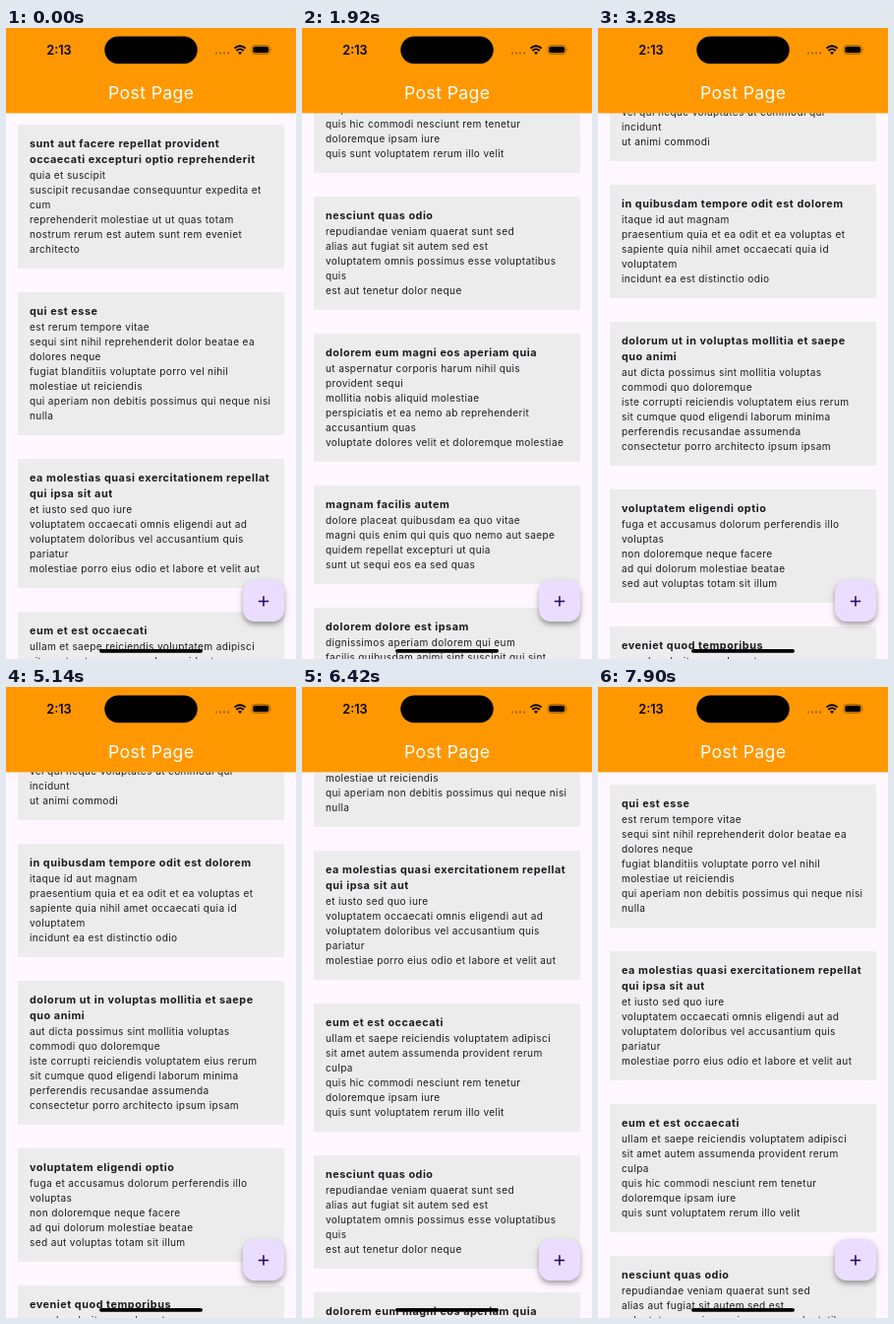
Animation, 295 px wide and 640 px high, one loop 8000 ms. Source, as an HTML page:

```html
<!DOCTYPE html>
<html lang="en">
<head>
<meta charset="utf-8">
<title>Post Page</title>
<style>
  html, body { margin: 0; width: 295px; height: 640px; overflow: hidden; }
  body { position: relative; background: #fef7ff; font-family: Inter, "Open Sans", sans-serif; }
  #list { position: absolute; left: 12px; top: 98px; width: 271px; }
  article { box-sizing: border-box; padding: 12px; margin-bottom: 24px; background: #ececec; color: #1d1b20;
    font-size: 10.1px; line-height: 15px; letter-spacing: .35px; white-space: pre; }
  h2 { margin: 0; font-size: 10.8px; font-weight: 700; line-height: 16px; letter-spacing: .54px; }
  #overlay { position: absolute; left: 0; top: 0; }
  #fab { position: absolute; left: 241px; top: 560.4px; width: 42px; height: 42px; border-radius: 12px;
    background: #eaddff; box-shadow: 0 3px 4px rgba(0, 0, 0, .25), 0 3px 9px rgba(0, 0, 0, .14); }
</style>
</head>
<body>
<div id="list"></div>
<div id="fab"></div>
<svg id="overlay" width="295" height="640">
  <rect width="295" height="86.4" fill="#ff9800"/>
  <rect x="100.3" y="8.4" width="94.4" height="27.8" rx="13.9"/>
  <text x="54" y="26.5" font-size="12.7" font-weight="600" text-anchor="middle">2:13</text>
  <text x="147.7" y="72" font-size="17.6" letter-spacing=".4" text-anchor="middle" fill="#fff">Post Page</text>
  <path d="M213 25.5h14" stroke="#a86708" stroke-width="2" stroke-dasharray="2 2"/>
  <g fill="none" stroke="#000" stroke-width="1.9">
    <path d="M232.4 20.6a8 8 0 0 1 11.2 0M234.4 23a5.2 5.2 0 0 1 7.2 0"/>
  </g>
  <path d="M238 27l-2-2.1a2.9 2.9 0 0 1 4 0z"/>
  <rect x="250" y="17.5" width="18.5" height="9" rx="2.8" fill="none" stroke="#a86708" stroke-width=".9"/>
  <rect x="251.3" y="18.8" width="15.9" height="6.4" rx="1.7"/>
  <path d="M269.5 20.4q1.4 1.6 0 3.2z" fill="#a86708"/>
  <path d="M256.8 581.4h10.4M262 576.2v10.4" stroke="#21005d" stroke-width="1.5"/>
  <rect x="95" y="629.9" width="105" height="3.8" rx="1.9"/>
</svg>
<script>
// Title lines start with "#"; posts are separated by blank lines.
const posts = `#sunt aut facere repellat provident
#occaecati excepturi optio reprehenderit
quia et suscipit
suscipit recusandae consequuntur expedita et
cum
reprehenderit molestiae ut ut quas totam
nostrum rerum est autem sunt rem eveniet
architecto

#qui est esse
est rerum tempore vitae
sequi sint nihil reprehenderit dolor beatae ea
dolores neque
fugiat blanditiis voluptate porro vel nihil
molestiae ut reiciendis
qui aperiam non debitis possimus qui neque nisi
nulla

#ea molestias quasi exercitationem repellat
#qui ipsa sit aut
et iusto sed quo iure
voluptatem occaecati omnis eligendi aut ad
voluptatem doloribus vel accusantium quis
pariatur
molestiae porro eius odio et labore et velit aut

#eum et est occaecati
ullam et saepe reiciendis voluptatem adipisci
sit amet autem assumenda provident rerum
culpa
quis hic commodi nesciunt rem tenetur
doloremque ipsam iure
quis sunt voluptatem rerum illo velit

#nesciunt quas odio
repudiandae veniam quaerat sunt sed
alias aut fugiat sit autem sed est
voluptatem omnis possimus esse voluptatibus
quis
est aut tenetur dolor neque

#dolorem eum magni eos aperiam quia
ut aspernatur corporis harum nihil quis
provident sequi
mollitia nobis aliquid molestiae
perspiciatis et ea nemo ab reprehenderit
accusantium quas
voluptate dolores velit et doloremque molestiae

#magnam facilis autem
dolore placeat quibusdam ea quo vitae
magni quis enim qui quis quo nemo aut saepe
quidem repellat excepturi ut quia
sunt ut sequi eos ea sed quas

#dolorem dolore est ipsam
dignissimos aperiam dolorem qui eum
facilis quibusdam animi sint suscipit qui sint
possimus cum
quaerat magni maiores excepturi
ipsam ut commodi dolor voluptatum modi aut
vitae

#nesciunt iure omnis dolorem tempora et
#accusantium
consectetur animi nesciunt iure dolore
enim quia ad
veniam autem ut quam aut nobis
et est aut quod aut provident voluptas autem
voluptas

#optio molestias id quia eum
quo et expedita modi cum officia vel magni
doloribus qui repudiandae
vero nisi sit
quos veniam quod sed accusamus veritatis
error

#et ea vero quia laudantium autem
delectus reiciendis molestiae occaecati non
minima eveniet qui voluptatibus
accusamus in eum beatae sit
vel qui neque voluptates ut commodi qui
incidunt
ut animi commodi

#in quibusdam tempore odit est dolorem
itaque id aut magnam
praesentium quia et ea odit et ea voluptas et
sapiente quia nihil amet occaecati quia id
voluptatem
incidunt ea est distinctio odio

#dolorum ut in voluptas mollitia et saepe
#quo animi
aut dicta possimus sint mollitia voluptas
commodi quo doloremque
iste corrupti reiciendis voluptatem eius rerum
sit cumque quod eligendi laborum minima
perferendis recusandae assumenda
consectetur porro architecto ipsum ipsam

#voluptatem eligendi optio
fuga et accusamus dolorum perferendis illo
voluptas
non doloremque neque facere
ad qui dolorum molestiae beatae
sed aut voluptas totam sit illum

#eveniet quod temporibus
reprehenderit quos placeat
velit minima officia dolores impedit
repudiandae molestiae nam
voluptas recusandae quis delectus
officiis harum fugiat vitae`;

const list = document.getElementById('list');
list.innerHTML = posts.split('\n\n').map(post => {
  const lines = post.split('\n').map(line => line[0] === '#' ? `<h2>${line.slice(1)}</h2>` : `<div>${line}</div>`);
  return `<article>${lines.join('')}</article>`;
}).join('');

const LOOP = 8000, TICK = 106;
// Each key: [tick, scroll offset, friction constant of the stretch leading to it]
const down = { start: 1700, keys: [[0, 100], [2, 575, 20], [10, 1248, 4.9], [15, 1606, 20]] };
const up = { start: 5140, keys: [[0, 1606], [7, 466, 3.8], [17, 201, 4.9], [26, 169, 4.9]] };

function glide({ start, keys }, time) {
  const tick = Math.floor((time - start + 15) / TICK);
  const i = keys.findIndex(key => key[0] > tick);
  if (i < 0) return keys[keys.length - 1][1];
  if (i === 0) return keys[0][1];
  const [t0, from] = keys[i - 1], [t1, to, friction] = keys[i];
  const decay = ticks => 1 - Math.exp(-ticks / friction);
  return from + (to - from) * decay(tick - t0) / decay(t1 - t0);
}

function scrollAt(time) {
  if (time < down.start) return 0;
  return Math.round(glide(time < up.start ? down : up, time));
}

function draw() {
  list.style.transform = `translateY(${-scrollAt(performance.now() % LOOP)}px)`;
  requestAnimationFrame(draw);
}
draw();
</script>
</body>
</html>
```
